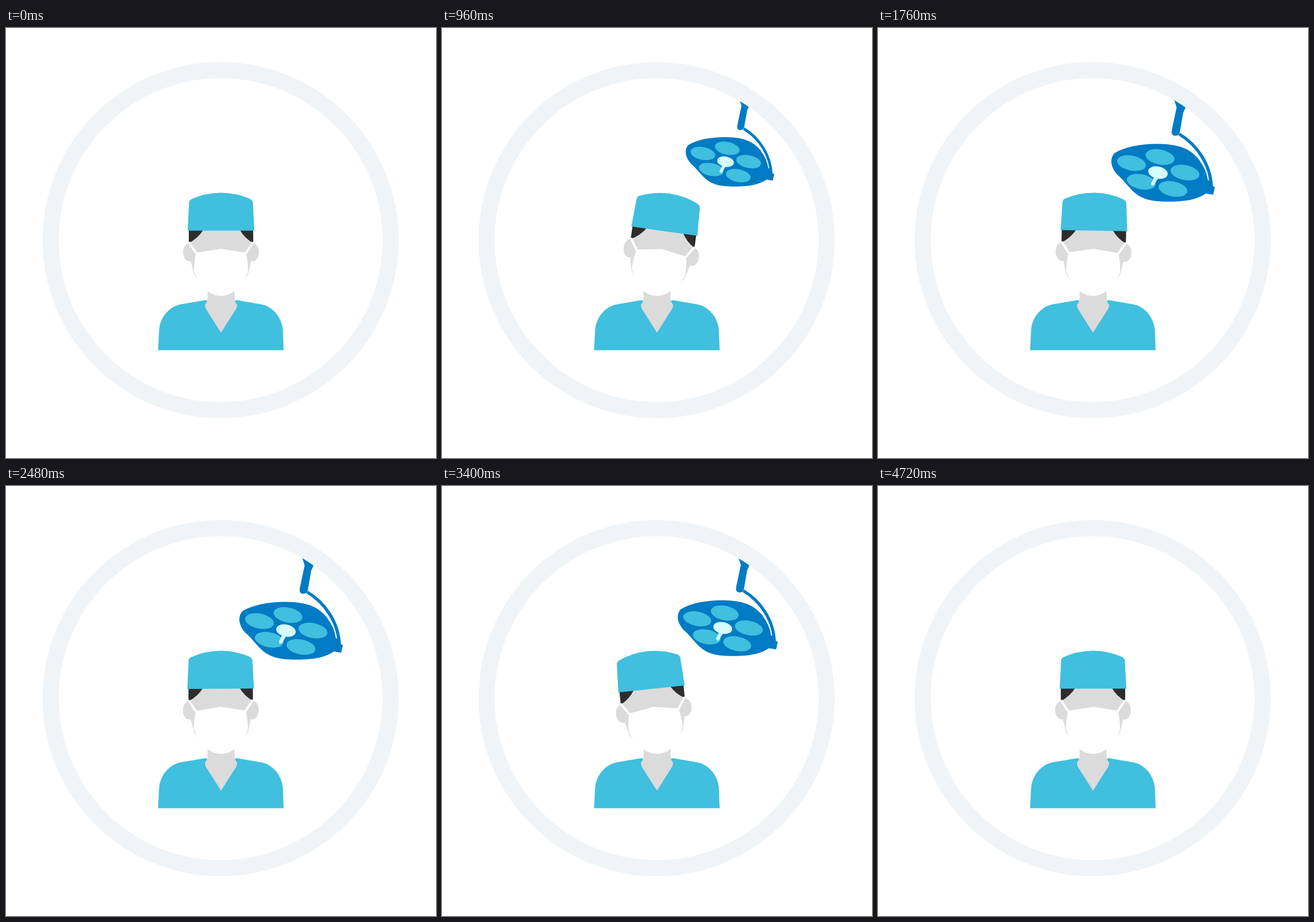
Write an HTML page with a canvas that moves like this. It is 748 by 748 pixels and loops after 4800 ms.

```html
<!DOCTYPE html>
<html lang="en">
<head>
<meta charset="utf-8">
<title>Surgeon and lamp</title>
<style>
  html, body { margin: 0; width: 100%; height: 100%; overflow: hidden; background: #fff; }
  canvas { display: block; width: 748px; height: 748px; }
</style>
</head>
<body>
<canvas id="stage" width="748" height="748"></canvas>
<script>
const ctx = document.getElementById('stage').getContext('2d');
const LOOP = 4800, STEP = 40;
const CYAN = '#40bfde', BLUE = '#007bc4', SKIN = '#dbdbdb', HAIR = '#2d2d2d';

const shapes = {
  shirt: 'M264.5 560.5L266.5 523C270 499 287 483.500 305 480.500L346 473.500Q350 473 352 477H396Q398 473 402 473.500L443 480.500C461 483.500 478 499 481.500 523L483 560.500Z',
  neck: 'M350.500 457.500Q361 466 374 466Q387 466 397.500 457.500V472Q398 477 402 481Q402.500 485 400 489L374 530L348 489Q345.500 485 346 481Q350 477 350.500 472Z',
  face: 'M318 350H430V385L426 407L421 428Q414 440 398 455H350Q334 440 327 428L322 407L318 385Z',
  hairLeft: 'M318 350H344Q334 366 318 374Z',
  hairRight: 'M430 350H406Q415 366 430 374Z',
  mask: 'M331 391L374 384L417 391Q421 404 421 424Q414 443 398 458Q387 466 374 466Q361 466 350 458Q334 443 327 424Q327 404 331 391Z',
  straps: 'M318 372.500L331 392M430 372.500L417 392',
  hat: 'M316 352.500L318.500 304Q318.500 299.500 323 297.500Q346 287 374 286.500Q402 287 425 297.500Q429 299.500 429.500 304L432 352.500Z',
  stem: 'M513 118L519.500 138L511 178Q509.500 187.500 517 187.500Q524 187.500 525 181L531 147L537 134L541 118Z',
  lampBody: 'M411 218C430 206 456 202 487 201.500C518 202 538 208 551 221C564 233 574 248 578 272L586 277L583 290L570 288C556 297 540 302 505 302C475 302 460 298 446 286C434 275 427 264 416 255C406 243 402 229 411 218Z',
  arm: 'M524 184.500C555 203 579 238 580 278',
  armGap: 'M560 230Q572 245 575 265',
  handle: 'M482 256L475 270Q475 276 480 273.500L488 260Z'
};
for (const key in shapes) shapes[key] = new Path2D(shapes[key]);

const bulbs = [[441, 235], [490.5, 224.5], [534, 251.5], [458, 267.5], [513, 280]];

const clamp01 = x => Math.max(0, Math.min(1, x));
const span = (t, from, to) => clamp01((t - from) / (to - from));
const smooth = x => x * x * (3 - 2 * x);
const mix = (a, b, k) =>
  `rgb(${a.map((v, i) => Math.round(v + (b[i] - v) * k)).join(',')})`;

function fill(shape, color) {
  ctx.fillStyle = color;
  ctx.fill(shapes[shape]);
}

function stroke(shape, color, width) {
  ctx.strokeStyle = color;
  ctx.lineWidth = width;
  ctx.stroke(shapes[shape]);
}

function ellipse(x, y, rx, ry, tilt, color) {
  ctx.fillStyle = color;
  ctx.beginPath();
  ctx.ellipse(x, y, rx, ry, tilt, 0, Math.PI * 2);
  ctx.fill();
}

// Head tilt in degrees: lean right, return, lean left, return.
function headTilt(t) {
  if (t < 960) return 8 * smooth(t / 960);
  if (t < 2280) return 8 * (1 - span(t, 960, 2200)) ** 2;
  if (t < 2960) return -7 * span(t, 2280, 2960) ** 2.4;
  return -3.5 * (1 + Math.cos(Math.PI * span(t, 2960, 4740)));
}

function lampScale(t) {
  if (t < 2000) {
    const p = span(t, 600, 1270);
    return 1 - (1 - p) ** 4 * (1 + 4 * p);
  }
  return 1 - smooth(span(t, 3340, 3880));
}

const lampGlow = t => span(t, 1180, 1280) * (1 - span(t, 1480, 1680));

function drawLamp(scale, glow) {
  if (scale < 0.005) return;
  ctx.save();
  ctx.translate(530, 119.5);
  ctx.scale(scale, scale);
  ctx.translate(-530, -119.5);
  fill('stem', BLUE);
  fill('lampBody', BLUE);
  stroke('armGap', '#fff', 2);
  stroke('arm', BLUE, 5.5);
  const bulbColor = mix([64, 191, 222], [118, 220, 243], glow);
  const handleColor = mix([213, 253, 255], [229, 255, 255], glow);
  for (const [x, y] of bulbs) ellipse(x, y, 25.5, 13, 0.2, bulbColor);
  fill('handle', handleColor);
  ellipse(487, 251.5, 17.2, 10.5, 0.2, handleColor);
  ctx.restore();
}

function drawHead(degrees) {
  ctx.save();
  ctx.translate(374, 444);
  ctx.rotate(degrees * Math.PI / 180);
  ctx.translate(-374, -444);
  ellipse(319.5, 390, 11.5, 16, 0, SKIN);
  ellipse(428.5, 390, 11.5, 16, 0, SKIN);
  fill('face', SKIN);
  fill('hairLeft', HAIR);
  fill('hairRight', HAIR);
  fill('mask', '#fff');
  stroke('straps', '#fff', 4);
  fill('hat', CYAN);
  ctx.restore();
}

function drawRing() {
  ctx.strokeStyle = '#f0f4f6';
  ctx.lineWidth = 28;
  ctx.beginPath();
  ctx.arc(373.3, 369, 295.7, 0, Math.PI * 2);
  ctx.stroke();
}

function draw(t) {
  ctx.fillStyle = '#fff';
  ctx.fillRect(0, 0, 748, 748);
  drawLamp(lampScale(t), lampGlow(t));
  drawRing();
  drawHead(headTilt(t));
  fill('shirt', CYAN);
  fill('neck', SKIN);
}

const start = performance.now();
function tick() {
  const t = (performance.now() - start) % LOOP;
  draw(Math.min(Math.floor(t / STEP) * STEP, 4720));
  requestAnimationFrame(tick);
}
tick();
</script>
</body>
</html>
```
